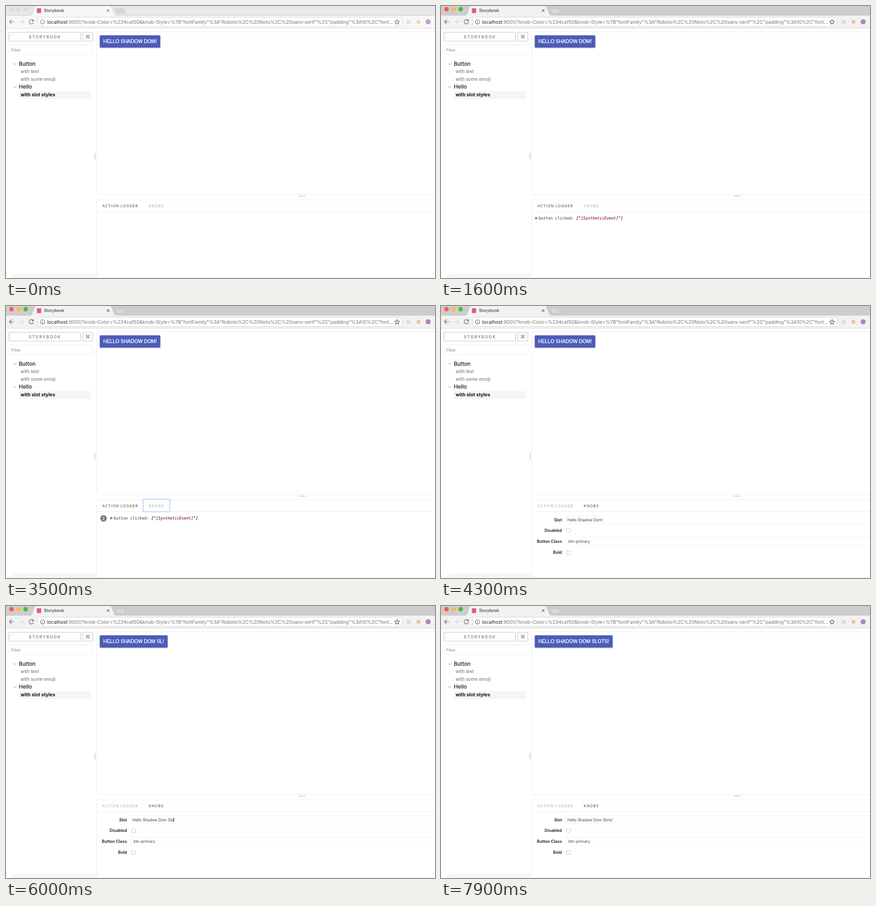
An HTML page that plays this animation: 939x596 px, repeating every 8000 ms.

```html
<!DOCTYPE html>
<html lang="en">
<head>
<meta charset="utf-8">
<title>Storybook</title>
<style>
  html, body { margin: 0; width: 100%; height: 100%; overflow: hidden; background: #fff; }
  svg { display: block; width: 939px; height: 596px; }
  text { font-family: Inter, "Open Sans", sans-serif; white-space: pre; }
  .line { fill: none; stroke: #ebebeb; }
  .icon { fill: none; stroke: #5f5f5f; stroke-width: 1.2; }
  .frame { fill: #fff; stroke: #c4c4c4; stroke-width: 1.2; }
  .kind { font-size: 11.9px; fill: #111; stroke: #111; stroke-width: .15; }
  .story { font-size: 9.95px; fill: #7c7c7c; stroke: #7c7c7c; stroke-width: .12; }
  .tab { font-size: 8px; letter-spacing: 1.06px; }
  .label { font-size: 8.9px; font-weight: 700; fill: #333; text-anchor: end; }
  .value { font-size: 8.4px; fill: #444; }
  .box { fill: #fff; stroke: #bdbdbd; stroke-width: .9; }
  .mono { font: 8.5px "DejaVu Sans Mono", monospace; }
  .mono .it { font-style: italic; stroke-width: .15; }
  .mark { fill: #151515; stroke: #151515; }
  #strip { fill: #cfcccd; }
  #bar, #page-tab { fill: #f3f2f3; }
  #plus { fill: #d9d6d7; stroke: #b3b0b1; }
  .idle #strip { fill: #e9e8e9; }
  .idle #bar, .idle #page-tab { fill: #f7f7f7; }
  .idle #plus { fill: #d6d6d6; stroke: #d0d0d0; }
  .idle .light { fill: #dcdcdc; stroke: #cecece; }
  .idle .icon { stroke: #7d7d7d; }
  .idle .ext { opacity: .75; }
</style>
</head>
<body>
<svg id="stage" viewBox="0 0 939 596">
  <defs>
    <filter id="shade" x="-10%" y="-20%" width="120%" height="160%">
      <feDropShadow dx="0" dy="1.2" stdDeviation=".8" flood-color="#000" flood-opacity=".32"/>
    </filter>
    <filter id="glow" x="-10%" y="-20%" width="120%" height="140%">
      <feGaussianBlur stdDeviation=".5"/>
    </filter>
  </defs>
  <rect width="939" height="596" fill="#fff"/>

  <g id="chrome">
    <rect id="strip" width="939" height="21"/>
    <rect id="bar" y="20" width="939" height="29"/>
    <path d="M0 20.5H54M241 20.5H939" stroke="#c3c1c2" stroke-width=".8"/>
    <path d="M0 49H939" stroke="#dadada"/>
    <path id="page-tab" d="M53 21Q56 20 57 17L62 3Q63 0 66 0H228Q230.500 0 231.500 3L237 17Q238 20 242 21Z"/>
    <path d="M53 20.500Q56 20 57 17L62 3Q63 0 65 0M229.500 0Q230.500 0 231.500 3L237 17Q238 20 242 20.500" fill="none" stroke="#bbb9ba" stroke-width=".8"/>
    <path id="plus" stroke-width=".8" d="M239 5H256Q258 5 259 7L262.500 17H245Q243 17 242 15L238 6Z"/>
    <circle class="light" cx="12" cy="7" r="4.600" fill="#fb5a55" stroke="#e0504b" stroke-width=".5"/>
    <circle class="light" cx="27.500" cy="7" r="4.600" fill="#f8bf4c" stroke="#dfa840" stroke-width=".5"/>
    <circle class="light" cx="43" cy="7" r="4.600" fill="#35c649" stroke="#2bad3e" stroke-width=".5"/>
    <rect x="67.500" y="5" width="9.500" height="10.500" rx="1" fill="#dc5c8d"/>
    <text x="83" y="13.300" font-size="9.150" fill="#222">Storybook</text>
    <path class="icon" d="M221 7.300l5.200 5.200M226.200 7.300l-5.200 5.200"/>
    <path class="icon" d="M17.500 34.500H8M12.500 29.500L7.500 34.500L12.500 39.500"/>
    <path d="M29 34.500H38.500M34 29.500L39 34.500L34 39.500" fill="none" stroke="#d6d6d6" stroke-width="1.200"/>
    <path class="icon" d="M59 31.200A4.800 4.800 0 1 0 60.200 35.500"/>
    <path d="M60.700 28.800V33.300H56.200Z" fill="#666"/>
    <rect x="69.500" y="24.500" width="797.500" height="20.500" rx="2" fill="#fff" stroke="#d2d2d2"/>
    <circle class="icon" cx="80" cy="34.700" r="4.700" stroke-width="1"/>
    <path class="icon" d="M80 34V37.500M80 31.700V32.900"/>
    <text x="90" y="38.500" font-size="10.460" fill="#757575"><tspan fill="#1d1d1d">localhost</tspan>:9001/?knob-Color=%234caf50&amp;knob-Style=%7B"fontFamily"%3A"Roboto%2C%20Noto%2C%20sans-serif"%2C"padding"%3A10%2C"font...</text>
    <path class="icon" stroke-width="1" d="M856 29.700l1.500 3.500 3.700.3-2.800 2.500.9 3.700-3.300-2-3.300 2 .9-3.700-2.800-2.500 3.700-.3z"/>
    <g class="ext">
      <rect x="877" y="30.500" width="8.500" height="8.500" rx="1.500" fill="#dcdcdc"/>
      <rect x="899" y="31" width="7.500" height="7.500" fill="#e6c694"/>
      <circle cx="924" cy="34.500" r="5.600" fill="#b583b5"/>
    </g>
  </g>

  <g id="sidebar">
    <rect class="frame" x="6.500" y="57.500" width="156.500" height="19.500" rx="1.500"/>
    <text x="50" y="70.600" font-size="8.600" font-weight="600" letter-spacing="1.900" fill="#828282">STORYBOOK</text>
    <rect class="frame" x="168" y="57.500" width="22" height="19.500" rx="1.500"/>
    <path d="M177.700 65.700V64.400A1.300 1.300 0 1 0 176.400 65.700H181.600A1.300 1.300 0 1 0 180.300 64.400V69.600A1.300 1.300 0 1 0 181.600 68.300H176.400A1.300 1.300 0 1 0 177.700 69.600Z" fill="none" stroke="#777" stroke-width=".9"/>
    <rect class="line" x="6.500" y="85.500" width="184" height="21" rx="2"/>
    <text x="11" y="100" font-size="9" fill="#8c8c8c">Filter</text>
    <path d="M16 125.300l3.200 3 3.200-3M16 176l3.200 3 3.200-3" fill="none" stroke="#8d8d8d"/>
    <text class="kind" x="28" y="130.700">Button</text>
    <text class="story" x="32" y="147.400">with text</text>
    <text class="story" x="32" y="163.600">with some emoji</text>
    <text class="kind" x="28" y="181.400">Hello</text>
    <rect x="28" y="187" width="158.500" height="17" fill="#f5f5f5"/>
    <text x="32" y="198.300" font-size="10.270" font-weight="700" fill="#111">with slot styles</text>
    <rect x="193" y="322" width="3.500" height="15" rx="1" fill="#e5e5e5"/>
    <path d="M6 596L20 586H198V596Z" fill="#f7f7f7"/>
  </g>

  <g id="panels">
    <rect class="line" x="198.500" y="56.500" width="760" height="356" rx="3"/>
    <rect x="640" y="415" width="16" height="3" rx="1" fill="#e2e2e2"/>
    <rect class="line" x="198.500" y="424.500" width="760" height="170" rx="3"/>
    <path class="line" d="M198 450.500H939"/>
    <rect id="button" x="205.300" y="64.300" height="26.700" rx="1.500" fill="#4b5cb9" filter="url(#shade)"/>
    <text id="caption" x="213" y="81.300" fill="#fff" stroke="#fff" stroke-width=".35" style="font:10.7px 'Liberation Sans',Arial,sans-serif"></text>
    <rect id="ring" x="300" y="423.500" width="58.500" height="27.500" rx="1" fill="none" stroke="#bdd6f6" stroke-width="2" filter="url(#glow)"/>
    <text id="log-tab" class="tab" x="210.500" y="440.800">ACTION LOGGER</text>
    <text id="knob-tab" class="tab" x="312.500" y="440.800">KNOBS</text>
  </g>

  <g id="log">
    <g id="badge">
      <circle cx="213.500" cy="465.500" r="7" fill="#757575"/>
      <text x="213.500" y="468.600" font-size="8.600" font-weight="600" fill="#fff" text-anchor="middle">2</text>
    </g>
    <g id="entry">
      <path d="M228.300 461.900L234.200 465L228.300 468.100Z" fill="#6e6e6e"/>
      <text class="mono" x="236" y="468"><tspan fill="#4f2260">button clicked</tspan><tspan fill="#222">: </tspan><tspan class="it mark">["</tspan><tspan class="it" fill="#8a2020" stroke="#8a2020">[SyntheticEvent]</tspan><tspan class="it mark">"]</tspan></text>
    </g>
  </g>

  <g id="knobs">
    <rect class="line" x="273" y="459" width="690" height="18.500" rx="2" stroke-opacity=".7"/>
    <rect class="line" x="273" y="506.500" width="690" height="19" rx="2" stroke-opacity=".7"/>
    <text class="label" x="264.700" y="471.500">Slot</text>
    <text class="label" x="264.700" y="494.700">Disabled</text>
    <text class="label" x="264.700" y="519.200">Button Class</text>
    <text class="label" x="264.700" y="543.200">Bold</text>
    <rect class="box" x="274.700" y="487.800" width="8.500" height="8.500" rx="2"/>
    <rect class="box" x="274.700" y="536" width="8.500" height="8.500" rx="2"/>
    <text id="slot" class="value" x="276.700" y="471.500"></text>
    <text class="value" x="279" y="519.200">btn-primary</text>
    <rect id="caret" y="463.500" width="1" height="9.500" fill="#333"/>
  </g>
</svg>
<script>
const LOOP = 8000;
const BASE = "Hello Shadow Dom", EXTRA = " Slots";
const TYPE_START = 5600, KEY_GAP = 125, ECHO = 60;
const $ = id => document.getElementById(id);
const show = (id, on) => $(id).style.display = on ? "" : "none";
const during = (t, from, to) => t >= from && t < to;

// Letters typed so far, inserted before the exclamation mark
function typed(t) {
  const n = Math.floor((t - TYPE_START) / KEY_GAP) + 1;
  return BASE + EXTRA.slice(0, Math.max(0, Math.min(EXTRA.length, n)));
}

function setText(id, s) {
  if ($(id).textContent !== s) $(id).textContent = s;
}

function draw(t) {
  $("chrome").setAttribute("class", t < 300 ? "idle" : "");

  const value = typed(t);
  setText("slot", value + "!");
  setText("caption", (typed(t - ECHO) + "!").toUpperCase());
  $("button").setAttribute("width", $("caption").getComputedTextLength() + 15.4);

  const onKnobs = t >= 3600, twice = t >= 2000;
  $("log-tab").setAttribute("fill", onKnobs ? "#aaa" : "#444");
  $("knob-tab").setAttribute("fill", onKnobs ? "#444" : "#aaa");
  show("ring", during(t, 3400, 4000));

  show("log", t >= 1500 && !onKnobs);
  show("badge", twice);
  $("entry").setAttribute("transform", `translate(${twice ? 0 : -22} 0)`);

  show("knobs", onKnobs);
  show("caret", during(t, 4500, 5000) || during(t, TYPE_START, 6800));
  if (onKnobs) {
    $("caret").setAttribute("x", $("slot").getEndPositionOfChar(value.length - 1).x - .3);
  }
}

function tick() {
  draw(performance.now() % LOOP);
  requestAnimationFrame(tick);
}
tick();
</script>
</body>
</html>
```
